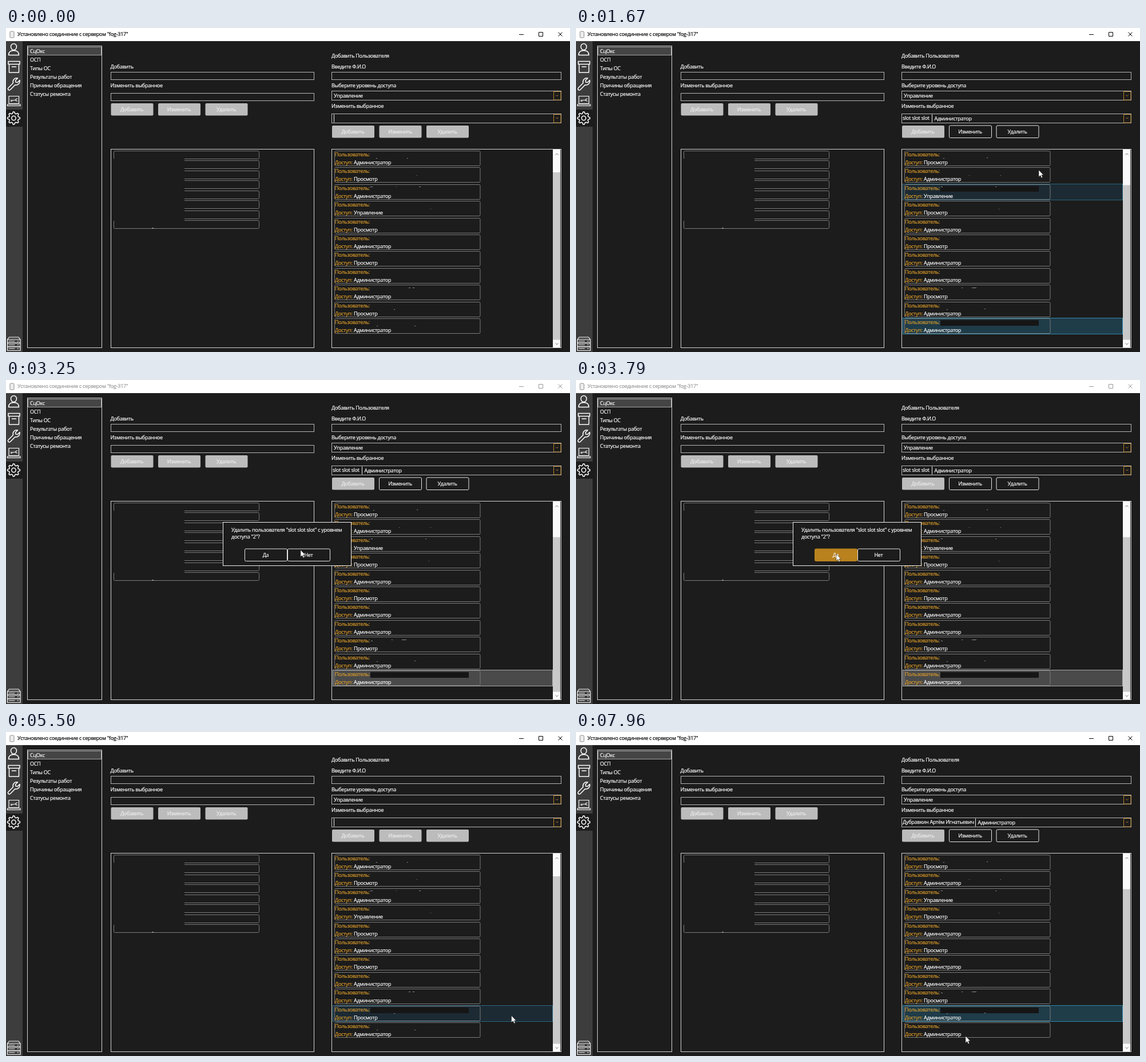
An HTML page for the animation above (8000 ms loop, 986 by 568 pixels).

```html
<!DOCTYPE html>
<html lang="ru">
<head>
<meta charset="utf-8">
<title>Настройки</title>
<style>
html, body { margin: 0; width: 100%; height: 100%; overflow: hidden; background: #1c1c1c; }
svg { display: block; }
text {
  font: 9px "Open Sans", "Noto Sans", sans-serif; letter-spacing: -.26px; white-space: pre;
  color: #fff; fill: currentColor; stroke: currentColor; stroke-width: .2px;
}
.line { fill: none; stroke: #d4d4d4; }
.field { fill: none; stroke: #b6b6b6; }
.card { fill: none; stroke: #7a7a7a; }
.icon { fill: none; stroke: #fff; stroke-width: 1.5; stroke-linejoin: round; stroke-linecap: round; }
.gold { color: #dc9c2a; }
.combo { fill: none; stroke: #b9842a; }
.btn rect { fill: none; stroke: #e6e6e6; }
.btn text { text-anchor: middle; }
.btn.off rect { fill: #bcbcbc; stroke: none; }
.btn.off text { color: #eee; }
.btn.hot rect { fill: #b9821e; stroke: #b9821e; }
.hover { fill: #1c2a33; stroke: #2a657f; }
.picked { fill: #1f3c49; stroke: #2f89ad; }
.idle { fill: #4a4a4a; stroke: #a8a8a8; }
#bar text { color: #000; }
#bar path { fill: none; stroke: #000; }
#bar.dim text { color: #999; }
#bar.dim path { stroke: #999; }
</style>
</head>
<body>
<svg id="stage" width="986" height="568" viewBox="0 0 986 568">
  <rect width="986" height="568" fill="#1c1c1c"/>
  <g id="bar">
    <rect width="986" height="23" fill="#fff"/>
    <rect x="7" y="6" width="7" height="11" rx="1.5" fill="#eee" stroke="#888"/>
    <text x="20" y="14">Установлено соединение с сервером "fog-317"</text>
    <path d="M897 11.5h8M931.5 7.5h7v7h-7zM965.5 7.5l7 7M972.5 7.5l-7 7"/>
  </g>
  <rect y="23" width="29" height="545" fill="#3d3d3d"/>
  <rect y="143" width="29" height="30" fill="#1c1c1c"/>
  <g class="icon" id="icons">
    <ellipse cx="13.5" cy="33" rx="5" ry="5.500"/>
    <path d="M4.500 47.500c0-6 3.500-8 9-8s9 2 9 8z"/>
    <path d="M4 58.500h20v5H4zM5.500 63.500h17V78h-17zM10.500 68h7"/>
    <path d="M4 105l8.500-8.500c-1.500-5 2.500-9.500 8-8.500l-4 4 .5 3 3 .5 4-4c1 5.500-3.500 9.500-8 8.200L7.500 108.300c-2.800 1.700-5.200-1-3.500-3.300z"/>
    <path d="M5 119.500h17.500v13H5zM2.500 134h22.500v2.500H2.500z" stroke-width="1.200"/>
    <path d="M9 128.500l3-2h5M19.500 124l-2.500 1v2l2.500 1M9 128.500v-2.500" stroke-width="1.200"/>
    <circle cx="13.500" cy="158" r="3.700"/>
    <path d="M5.500 542h16.500l3 4H2.500zM2.500 546h22.500v6H2.500zM2.500 552.500h22.500v6H2.500zM2.500 559h22.500v6.500H2.500zM5 549h10M5 555.500h10M5 562h10M20 549h2M20 555.500h2M20 562h2" stroke-width="1.200"/>
  </g>
  <rect class="line" x="37.500" y="31.500" width="130" height="529"/>
  <g class="field">
    <rect x="183.500" y="77.500" width="355" height="13"/>
    <rect x="183.500" y="114.500" width="355" height="13"/>
    <rect x="569.500" y="77.500" width="401" height="13"/>
    <rect x="569.500" y="110.500" width="401" height="16"/>
    <rect x="569.500" y="150.500" width="401" height="16"/>
  </g>
  <rect x="38.500" y="33.500" width="128" height="14" fill="#454545" stroke="#a5a5a5"/>
  <g class="combo">
    <path d="M957.500 111.500h12.500v14.500h-12.500zM957.500 151.500h12.500v14.500h-12.500zM961.500 117.500l2 2 2-2M961.500 157l2 2 2-2"/>
  </g>
  <g id="labels"></g>
  <g id="entry">
    <path id="split" stroke="#eee"/>
    <text id="who" x="571" y="160.500"></text>
    <text id="level" y="162"></text>
  </g>
  <g id="buttons"></g>
  <g id="small">
    <rect id="smallHot" class="hover" x="184.500" width="353" height="17"/>
    <g id="smallCards"></g>
    <rect x="187" y="229" width="125" height="109" fill="#1c1c1c"/>
    <path d="M255 351h3" stroke="#ccc"/>
  </g>
  <g id="users"></g>
  <path id="specks" stroke="#8c8c8c"/>
  <rect class="line" x="183.500" y="212.500" width="355" height="348"/>
  <rect class="line" x="569.500" y="212.500" width="401" height="348"/>
  <rect x="956" y="213" width="13" height="347" fill="#fafafa"/>
  <rect id="thumb" x="956" width="13" fill="#c9c9c9"/>
  <path d="M960.500 222.500l2.500-2.500 2.500 2.500M960.500 552.500l2.500 2.500 2.500-2.500" fill="none" stroke="#777"/>
  <g id="dialog">
    <rect x="379.500" y="249.500" width="224" height="76" fill="#1c1c1c" stroke="#f0f0f0"/>
    <text x="394" y="266">Удалить пользователя "slot slot slot" с уровнем</text>
    <text x="394" y="278">доступа "2"?</text>
  </g>
  <path id="cursor" d="M0 0V12L2.800 9.400L4.800 13.700L6.700 12.800L4.800 8.700H8.300Z" fill="#fff" stroke="#111" stroke-width=".5"/>
</svg>
<script>
const LOOP = 8000, ROWS = 11, STEP = 29.4, SMALL_STEP = 17.45;
const $ = id => document.getElementById(id);

function add(parent, tag, attrs, text) {
  const node = document.createElementNS('http://www.w3.org/2000/svg', tag);
  for (const key in attrs) node.setAttribute(key, attrs[key]);
  if (text) node.textContent = text;
  return parent.appendChild(node);
}

const label = (x, y, text) => add($('labels'), 'text', { x, y }, text);

function button(parent, x, y, text) {
  const g = add(parent, 'g', { class: 'btn' });
  add(g, 'rect', { x: x + .5, y: y + .5, width: 74, height: 21.5, rx: 2 });
  add(g, 'text', { x: x + 37, y: y + 14.5 }, text);
  return { x, y, set: name => g.setAttribute('class', 'btn ' + name) };
}

['СцОкс', 'ОСП', 'Типы ОС', 'Результаты работ', 'Причины обращения', 'Статусы ремонта']
  .forEach((text, i) => label(42, 43.5 + 15 * i, text));
label(182.5, 71, 'Добавить');
label(182.5, 104, 'Изменить выбранное');
label(569, 51.5, 'Добавить Пользователя');
label(569, 71, 'Введите Ф.И.О');
label(569, 104, 'Выберите уровень доступа');
label(573, 122, 'Управление');
label(569, 140, 'Изменить выбранное');

const names = ['Добавить', 'Изменить', 'Удалить'];
names.forEach((text, i) => button($('buttons'), 183 + 82.5 * i, 131.5, text).set('off'));
const [addBtn, editBtn, dropBtn] = names.map((text, i) => button($('buttons'), 569.5 + 82.5 * i, 170.5, text));
addBtn.set('off');
const yes = button($('dialog'), 417, 295.5, 'Да');
button($('dialog'), 492, 295.5, 'Нет');

// Gear outline with eight teeth
const gear = Array.from({ length: 32 }, (_, i) => {
  const r = i % 4 < 2 ? 11 : 8.3, a = (i - .5) * Math.PI / 16;
  return (13.5 + r * Math.cos(a)).toFixed(1) + ',' + (158 + r * Math.sin(a)).toFixed(1);
});
add($('icons'), 'polygon', { points: gear.join(' ') });

for (let i = 0; i < 8; i++)
  add($('smallCards'), 'rect', {
    class: 'card', x: 188.5, y: Math.round(215 + SMALL_STEP * i) + .5, width: 254, height: 14, rx: 2
  });

const rows = Array.from({ length: ROWS }, (_, i) => {
  const y = Math.round(214 + STEP * i), g = $('users');
  const back = add(g, 'rect', { x: 571.5, y: y + .5, width: 384, height: 28 });
  add(g, 'rect', { class: 'card', x: 574.5, y: y + 1.5, width: 254.5, height: 26, rx: 2 });
  const mask = add(g, 'rect', { x: 637, y: y + 4, width: 172, height: 10, fill: '#161616' });
  add(g, 'text', { class: 'gold', x: 575, y: y + 11 }, 'Пользователь:');
  add(g, 'text', { class: 'gold', x: 575, y: y + 24.5 }, 'Доступ:');
  const level = add(g, 'text', { x: 608, y: y + 24.5 });
  return { back, mask, level };
});

const LEVELS = { а: 'Администратор', п: 'Просмотр', у: 'Управление' };
const ACCESS = 'апаупапаапаа';
const SPECKS = [
  'M647 228.500h2M701 228.500h2M718 258.500h1M637 278.500h4M682 278.500h1M722 278.500h3M742 317.500h1M704 455.500h3M711 455.500h3M678 493.500h2M648 522.500h2M714 522.500h2',
  'M642 228.500h2M718 227.500h2M687 258.500h1M742 258.500h1M638 278.500h3M733 278.500h2M739 317.500h1M638 457.500h3M674 455.500h2M692 455.500h8M648 493.500h2M714 492.500h2'
];

const PATH = [
  [0, 700, 85], [40, 700, 85], [350, 705, 330], [830, 683, 547], [880, 683, 547], [920, 675, 527],
  [1420, 675, 527], [1670, 809, 249], [1950, 798, 165], [2210, 784, 183], [2560, 784, 183],
  [3130, 530, 290], [3250, 515, 298], [3790, 455, 305], [3960, 455, 305], [4300, 462, 306],
  [4500, 471, 308], [4750, 640, 390], [5580, 890, 500], [5960, 947, 562], [6100, 949, 575],
  [6300, 945, 575], [6420, 880, 515], [6500, 880, 515], [6900, 710, 470], [7200, 676, 494],
  [7330, 676, 494], [7960, 681, 533], [8000, 681, 533]
];

function pointer(t) {
  const i = PATH.findIndex(p => p[0] > t);
  const [t0, x0, y0] = PATH[Math.max(0, i - 1)], [t1, x1, y1] = PATH[i];
  const u = Math.max(0, (t - t0) / (t1 - t0)), k = u * u * (3 - 2 * u);
  return [x0 + (x1 - x0) * k, y0 + (y1 - y0) * k];
}

const within = (t, a, b) => t >= a && t < b;
const show = (node, on) => { node.style.display = on ? '' : 'none'; };
const over = (b, x, y) => x > b.x && x < b.x + 75 && y > b.y && y < b.y + 22;

function draw(t) {
  const [x, y] = pointer(t);
  $('cursor').setAttribute('transform', `translate(${x.toFixed(1)} ${y.toFixed(1)})`);
  show($('cursor'), t >= 80);

  // Hover trails the pointer slightly
  const [hx, hy] = pointer(Math.max(0, t - 50));
  const live = t < 850 || within(t, 1420, 2330) || within(t, 4000, 7300);
  const scrolled = within(t, 450, 4680) || t >= 6750;
  const first = within(t, 1100, 4000), second = t >= 7200;
  const chosen = first ? 10 : second ? 9 : -1;
  const hot = live && within(hx, 571, 956) ? Math.floor((hy - 214) / STEP) : -1;

  rows.forEach((row, i) => {
    const style = i === chosen ? (within(t, 2330, 4000) ? 'idle' : 'picked') : i === hot ? 'hover' : '';
    row.back.setAttribute('class', style);
    show(row.back, style);
    show(row.mask, style);
    row.level.textContent = LEVELS[ACCESS[i + scrolled]];
  });
  $('specks').setAttribute('d', SPECKS[+scrolled]);
  const top = scrolled ? 275.5 : 253;
  $('thumb').setAttribute('y', top);
  $('thumb').setAttribute('height', 546.5 - top);

  const line = Math.floor((hy - 214) / SMALL_STEP);
  show($('smallHot'), live && within(hx, 184, 538) && within(line, 0, 8));
  $('smallHot').setAttribute('y', Math.round(213.5 + SMALL_STEP * line) + .5);

  const split = first ? 622.5 : second ? 698.5 : 573.5;
  $('split').setAttribute('d', `M${split} 151.500v14`);
  $('who').textContent = first ? 'slot slot slot' : second ? 'Дубравкин Артём Игнатьевич' : '';
  $('level').textContent = chosen < 0 ? '' : LEVELS.а;
  $('level').setAttribute('x', split + 4);

  const asking = within(t, 2560, 4000);
  const state = b => chosen < 0 ? 'off' : !asking && over(b, hx, hy) ? 'hot' : '';
  editBtn.set(state(editBtn));
  dropBtn.set(state(dropBtn));
  show($('dialog'), asking);
  $('bar').setAttribute('class', asking ? 'dim' : '');
  yes.set(over(yes, hx, hy) ? 'hot' : '');
}

const start = performance.now();
function tick() {
  draw((performance.now() - start) % LOOP);
  requestAnimationFrame(tick);
}
tick();
</script>
</body>
</html>
```
